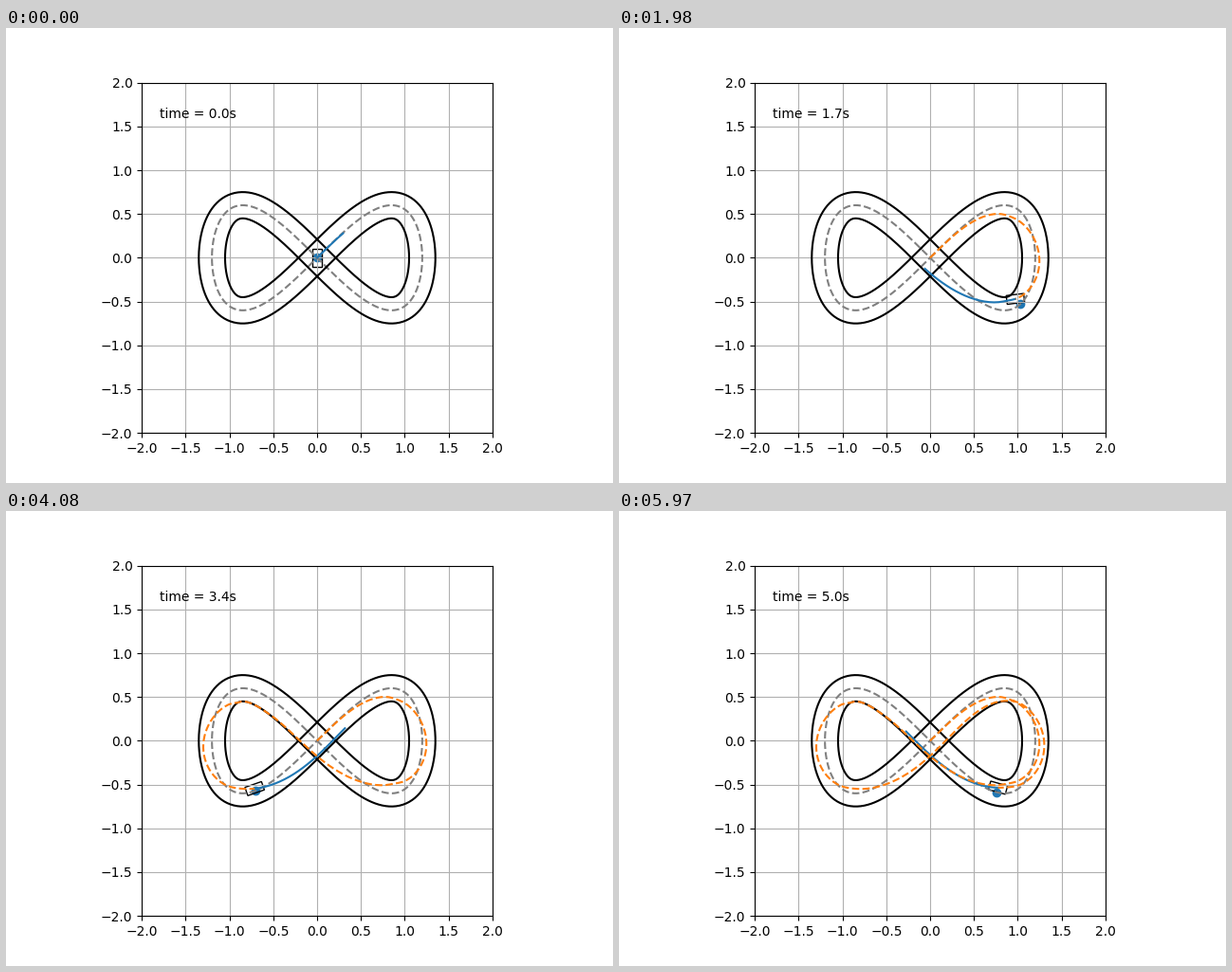
Recreate the animation shown at these times as a matplotlib script. Size 640 by 480 pixels, loop 6000 ms.

```python
import numpy as np
import matplotlib.pyplot as plt
from matplotlib.animation import FuncAnimation
from matplotlib.patches import Polygon

FRAMES, DT, HORIZON = 200, 0.025, 20
CAR_LENGTH, CAR_WIDTH, TRACK_HALF = 0.2, 0.1, 0.15


def lane(s, offset=0.0):
    """Point of the figure eight at parameter s, shifted to the left by offset."""
    dx, dy = np.cos(s), np.cos(2 * s)
    norm = np.hypot(dx, dy)
    return np.stack([1.2 * np.sin(s) - offset * dy / norm,
                     0.6 * np.sin(2 * s) + offset * dx / norm], axis=-1)


def racing_offset(s):
    """Side shift of the racing line, plus a start-up swing that dies out."""
    steady = (-0.09 * np.cos(s) - 0.028 * np.sin(s)
              - 0.013 * np.cos(3 * s) - 0.078 * np.sin(3 * s)
              - 0.017 * np.cos(5 * s) + 0.046 * np.sin(5 * s))
    swing = 0.124 * np.exp(-s / 2.5) * np.cos(1.7 * s - 0.25)
    return np.clip(steady + swing, -TRACK_HALF, TRACK_HALF)


def racing_line(s):
    return lane(s, racing_offset(s))


def drive(count, substeps=8, eps=1e-3):
    """Track parameter at each step: fast on the straights, slow in the bends."""
    s, out, h = 0.0, [], DT / substeps
    for k in range(count * substeps):
        if k % substeps == 0:
            out.append(s)
        speed = (2.22 + 0.43 * np.cos(2 * s - 0.2)) * (1 - np.exp(-k * h / 0.63))
        stretch = np.linalg.norm(racing_line(s + eps) - racing_line(s)) / eps
        s += h * speed / stretch
    return np.array(out)


progress = drive(FRAMES + HORIZON + 1)
path = racing_line(progress)

# the car turns in slightly ahead of its path
steps = np.arange(FRAMES)
ahead = path[steps + 5] - path[steps + 2]
heading = np.unwrap(np.arctan2(ahead[:, 1], ahead[:, 0]))
heading += (np.pi / 2 - heading[0]) * np.exp(-steps / 4)

box = np.array([(-1, -1), (1, -1), (1, 1), (-1, 1)]) * [CAR_LENGTH / 2, CAR_WIDTH / 2]


def car_corners(i):
    c, s = np.cos(heading[i]), np.sin(heading[i])
    return path[i] + box @ np.array([[c, s], [-s, c]])


def prediction(i):
    """The planned path runs wide towards the outside of the bends."""
    s = progress[i:i + HORIZON + 1]
    wide = 0.12 * np.linspace(0, 1, len(s)) ** 2 * np.sin(s) ** 3
    return lane(s, np.clip(racing_offset(s) + wide, -TRACK_HALF, TRACK_HALF))


fig, ax = plt.subplots(figsize=(6.4, 4.8), dpi=100)
ax.set_aspect("equal")
ax.set(xlim=(-2, 2), ylim=(-2, 2))
ticks = np.arange(-2, 2.1, 0.5)
ax.set_xticks(ticks)
ax.set_yticks(ticks)
ax.grid()

lap = np.linspace(0, 2 * np.pi, 400)
ax.plot(*lane(lap).T, "--", color="gray")
for side in (TRACK_HALF, -TRACK_HALF):
    ax.plot(*lane(lap, side).T, color="black")

dot = ax.scatter([0], [0], color="C0")
car = ax.add_patch(Polygon(car_corners(0), fill=False, edgecolor="black"))
plan, = ax.plot([], [], color="C0")
trail, = ax.plot([], [], "--", color="C1")
clock = ax.text(0.05, 0.9, "", transform=ax.transAxes)


def update(i):
    dot.set_offsets([lane(progress[i])])
    car.set_xy(car_corners(i))
    plan.set_data(*prediction(i).T)
    trail.set_data(*path[:i + 1].T)
    clock.set_text(f"time = {i * DT:.1f}s")
    return dot, car, plan, trail, clock


anim = FuncAnimation(fig, update, frames=FRAMES, interval=30, repeat=True, repeat_delay=0)
plt.show()
```
